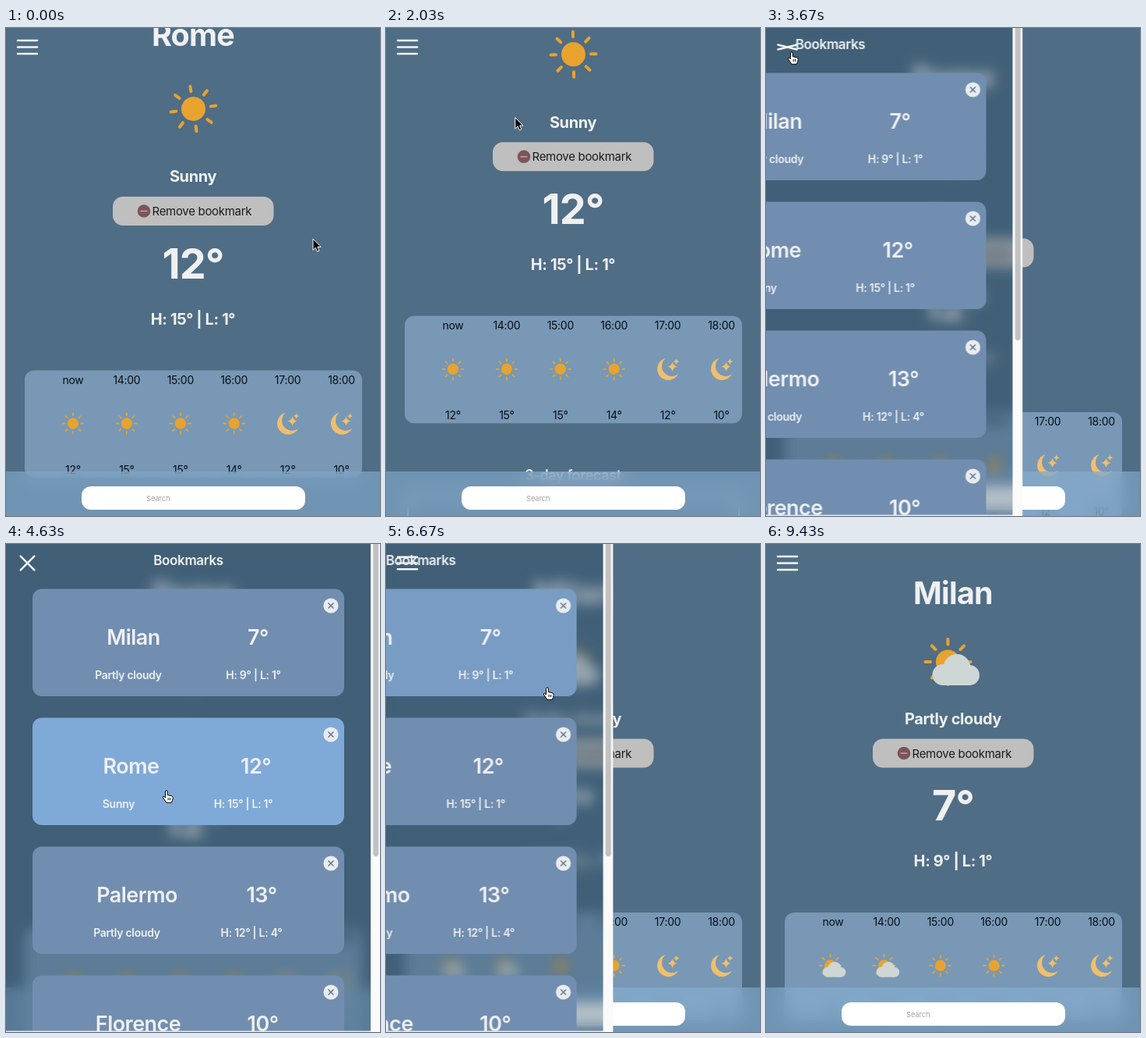
An HTML page for the animation above (9530 ms loop, 480 px wide and 625 px high).

```html
<!DOCTYPE html>
<html lang="en">
<head>
<meta charset="utf-8">
<title>Weather</title>
<style>
html, body { margin: 0; width: 100%; height: 100%; overflow: hidden; background: #4f6d85; }
svg, div { position: absolute; top: 0; left: 0; }
svg { width: 481px; height: 625px; overflow: hidden; }
text { font-family: Inter, Roboto, sans-serif; letter-spacing: -.02em; }
#bar { top: 568px; width: 480px; height: 57px; background: rgba(135,175,210,.6); backdrop-filter: blur(10px); }
#drawer { width: 481px; height: 625px; background: rgba(40,72,95,.35); backdrop-filter: blur(8px); }
</style>
</head>
<body>
<svg id="page"></svg>
<div id="bar"><svg style="height:57px">
  <rect x="97" y="19" width="287" height="30" rx="12" fill="#fff"/>
  <text x="180" y="37.5" font-size="9.5" fill="#a5a5a5">Search</text>
</svg></div>
<div id="drawer"><svg id="list"></svg></div>
<svg id="top">
  <g stroke="#f4f4f6" stroke-width="2.5" stroke-linecap="round">
    <path id="b0" d="M-12.5 0H12.5"/><path id="b1" d="M-12.5 0H12.5"/><path id="b2" d="M-12.5 0H12.5"/>
  </g>
  <g id="cursor" stroke-linejoin="round">
    <path id="arrow" d="M0 0V14.5L3.3 11.3L5.5 16.3L8 15.2L5.8 10.4H10.2Z" fill="#000" stroke="#fff"/>
    <path id="hand" d="M-1.5 7V1.2a1.4 1.4 0 0 1 2.8 0V5.5l5 1.2q2 .6 2 2.6l-.8 3.2-1.2 2.8H0L-4.5 9q-.6-1.8 1.2-1.8L-1.5 9ZM2.2 9v3M4.6 9v3" fill="#fff" stroke="#000"/>
  </g>
</svg>
<script>
const LOOP = 9530;
const $ = id => document.getElementById(id);
const place = (el, x, y, more = '') => el.setAttribute('transform', `translate(${x} ${y}) ${more}`);

const text = (x, y, size, weight, fill, str, anchor = 'middle') =>
  `<text x="${x}" y="${y}" font-size="${size}" font-weight="${weight}" fill="${fill}" text-anchor="${anchor}">${str}</text>`;
const light = (x, y, size, weight, str) => text(x, y, size, weight, '#f0f0f2', str);
const dark = (x, y, str) => text(x, y, 14, 400, '#0a0f14', str);
const group = (x, y, scale, body) => `<g transform="translate(${x} ${y}) scale(${scale})">${body}</g>`;

// Weather icons
const rays = [...Array(8).keys()].map(i => `<path d="M0-22.5V-29" transform="rotate(${i * 45})"/>`).join('');
const sun = `<g class="sun" fill="#e8a32e" stroke="#e8a32e" stroke-width="4" stroke-linecap="round"><circle r="15.5" stroke="none"/>${rays}</g>`;
const cloud = `<g class="cloud" fill="#ced6d6"><circle cx="-6.5" cy="16.5" r="13.5"/><circle cx="11.5" cy="7.5" r="17.5"/>
  <circle cx="27.5" cy="17" r="13"/><path d="M-6.5 12H27.5V30H-6.5Z"/></g>`;
const star = (x, y, r) => `<path d="M${x} ${y - r}q${r * .2} ${r * .8} ${r} ${r}q${-r * .8} ${r * .2} ${-r} ${r}q${-r * .2} ${-r * .8} ${-r} ${-r}q${r * .8} ${-r * .2} ${r} ${-r}"/>`;
const moon = `<g fill="#f1bf6c"><path d="M-2.5-14A14.3 14.3 0 1 0 13.5 6.5A12.6 12.6 0 0 1-2.5-14Z"/>${star(6, -3, 6)}${star(11, -9.5, 3.5)}</g>`;
const small = {
  s: x => group(x, 68, .46, sun),
  c: x => group(x - 3.5, 68, .49, sun + cloud),
  m: x => group(x, 68, 1, moon)
};

function city(id, name, sky, temp, range, dy, mainIcon, icons, temps) {
  const hours = ['now', '14:00', '15:00', '16:00', '17:00', '18:00'];
  const cols = hours.map((h, i) => {
    const x = 86 + i * 68.9;
    return dark(x, 17, h) + small[icons[i]](x) + dark(x, 132, temps[i] + '°');
  }).join('');
  return `<g id="${id}">${light(240, 77, 39.5, 700, name)}${mainIcon}
    <g transform="translate(0 ${dy})">
      ${light(240, 251, 20, 650, sky)}
      <rect x="137" y="269.5" width="206.5" height="37" rx="13" fill="#bfbfbf"/>
      <circle cx="177" cy="288" r="8.3" fill="#7d5558"/><path d="M172.5 288h9" stroke="#c3a9aa" stroke-width="1.4"/>
      ${text(187.5, 293.5, 15, 400, '#1b1b1b', 'Remove bookmark', 'start')}
      ${light(240, 374, 54, 700, temp)}
      ${light(240, 433, 20, 650, range)}
      <g transform="translate(0 492)"><rect x="24" width="433" height="137.5" rx="12" fill="#7898b6"/>${cols}</g>
      ${light(240, 702, 18, 600, '3-day forecast')}
      <rect x="28" y="720" width="425" height="210" rx="10" fill="none" stroke="#f0f0f2" stroke-width="1.5"/>
    </g></g>`;
}
$('page').innerHTML =
  city('rome', 'Rome', 'Sunny', '12°', 'H: 15° | L: 1°', 0, group(240.5, 157, 1, sun), 'ssssmm', [12, 15, 15, 14, 12, 10]) +
  city('milan', 'Milan', 'Partly cloudy', '7°', 'H: 9° | L: 1°', -20, group(233.5, 151, 1, sun + cloud), 'ccssmm', [7, 8, 9, 8, 6, 5]);

// Bookmark cards: name, temperature, sky, range, then the centre of each text
const saved = [
  ['Milan', '7°', 'Partly cloudy', 'H: 9° | L: 1°', 163.5, 323.5, 157, 317.5],
  ['Rome', '12°', 'Sunny', 'H: 15° | L: 1°', 160.5, 320.5, 144.5, 304.5],
  ['Palermo', '13°', 'Partly cloudy', 'H: 12° | L: 4°', 168, 328, 155, 315],
  ['Florence', '10°', 'Sunny', 'H: 12° | L: 3°', 169.5, 329.5, 150, 312]
];
$('list').innerHTML = light(234, 26.5, 17, 600, 'Bookmarks') +
  saved.map(([name, temp, sky, range, a, b, c, d], i) => group(0, 57.5 + i * 165, 1,
    `<rect id="card${i}" x="34" width="400" height="137.5" rx="12" fill="#718eb0"/>
    ${light(a, 71, 27, 600, name)}${light(b, 71, 27, 600, temp)}
    ${light(c, 115.5, 14, 600, sky)}${light(d, 115.5, 14, 600, range)}
    <circle cx="417" cy="21.5" r="9.6" fill="#e9ecef"/>
    <path d="M413.5 18l7 7m0-7l-7 7" stroke="#5a6f86" stroke-width="1.4"/>`)).join('') +
  `<rect y="623.5" width="468" height="1.5" fill="#e3e7ec"/>
  <rect x="468" width="13" height="625" fill="#fafafa"/>
  <rect x="471.2" y="-5" width="7" height="405" rx="3.5" fill="#c1c1c4"/>`;

const clamp = x => Math.min(1, Math.max(0, x));

// CSS "ease": cubic-bezier(.25, .1, .25, 1)
function ease(x) {
  x = clamp(x);
  let lo = 0, hi = 1;
  for (let i = 0; i < 20; i++) {
    const u = (lo + hi) / 2, v = 1 - u;
    if (.75 * u * v * v + .75 * u * u * v + u ** 3 < x) lo = u; else hi = u;
  }
  const v = 1 - lo;
  return .3 * lo * v * v + 3 * lo * lo * v + lo ** 3;
}
const span = (t, from, to) => ease((t - from) / (to - from));

// Smooth interpolation through [time, ...values] keys
function track(t, keys) {
  const i = keys.findIndex(k => k[0] > t);
  if (i === 0) return keys[0].slice(1);
  if (i < 0) return keys.at(-1).slice(1);
  const a = keys[i - 1], b = keys[i];
  const u = (t - a[0]) / (b[0] - a[0]), s = u * u * (3 - 2 * u);
  return a.slice(1).map((v, j) => v + (b[j + 1] - v) * s);
}

const scrollKeys = [[0, 53.5], [1000, 153.5], [1500, 160], [1900, 146], [2420, 2], [2830, 0]];
const pointerKeys = [[0, 394, 270], [1000, 306, 226], [1900, 190, 130], [2420, 37, 33], [2830, 33, 31],
  [4000, 33, 31], [4370, 190, 150], [4620, 206, 316], [5200, 206, 316], [6100, 207, 184],
  [6750, 207, 184], [7530, 330, 220], [8300, 405, 254]];
const hoverKeys = [
  [[4180, 0], [4330, .6], [4560, 0], [6100, 0], [6200, .35], [6570, .35], [6900, 1]],
  [[4430, 0], [4620, 1], [5650, 1], [5900, 0]]
];
const [romeSun, milanSun] = ['#rome', '#milan'].map(s => document.querySelector(s + ' .sun'));
const milanCloud = document.querySelector('#milan .cloud');

function draw(t) {
  const second = t >= 6570;
  $('rome').style.display = second ? 'none' : '';
  $('milan').style.display = second ? '' : 'none';
  place($('rome'), 0, -track(t, scrollKeys)[0]);
  romeSun.setAttribute('transform', `rotate(${Math.min(0, t / 300 - 8)})`);
  milanSun.setAttribute('transform', `rotate(${(t - 9430) * .008})`);
  place(milanCloud, 8 * Math.sin(Math.PI * (t - 6670) / 2760), 0);

  const open = span(t, 3430, 4030) - span(t, 6525, 7125);
  $('drawer').style.display = open > 0 ? '' : 'none';
  $('drawer').style.transform = `translateX(${481 * (open - 1)}px)`;
  hoverKeys.forEach((keys, i) => {
    const h = track(t, keys)[0];
    $('card' + i).setAttribute('fill', `rgb(${113 + 14 * h},${142 + 28 * h},${176 + 39 * h})`);
  });

  // Bars slide together, then cross; reversed when closing
  const slide = span(t, 3430, 3630) - span(t, 6590, 6720);
  const turn = 45 * (span(t, 3630, 3830) - span(t, 6530, 6595));
  const gap = 8.5 * (1 - slide);
  place($('b0'), 27.5, 24.5 - gap, `rotate(${turn})`);
  place($('b1'), 27.5, 24.5);
  $('b1').style.opacity = 1 - slide;
  place($('b2'), 27.5, 24.5 + gap, `rotate(${-turn})`);

  const [x, y] = track(t, pointerKeys), pointing = t > 2380 && t < 6800;
  place($('cursor'), x, y);
  $('cursor').style.display = t < 8470 ? '' : 'none';
  $('hand').style.display = pointing ? '' : 'none';
  $('arrow').style.display = pointing ? 'none' : '';
}

const start = performance.now();
(function frame() {
  draw((performance.now() - start) % LOOP);
  requestAnimationFrame(frame);
})();
</script>
</body>
</html>
```
